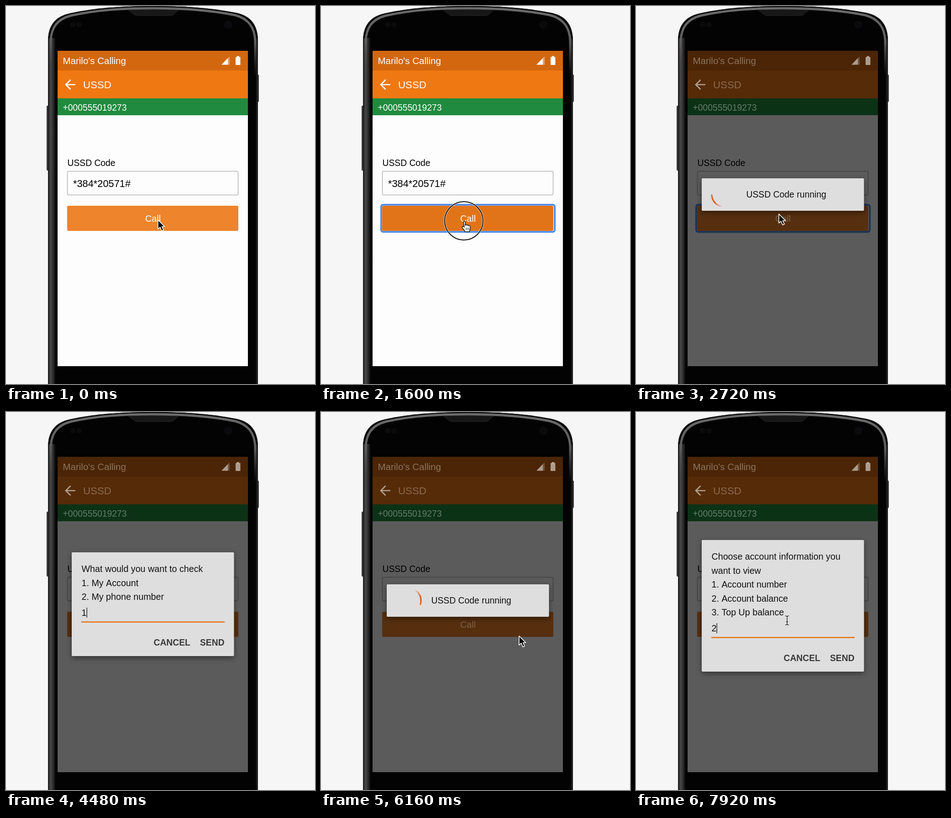
An HTML page with a canvas that plays this animation: 677x827 px, repeating every 8 s.

```html
<!DOCTYPE html>
<html lang="en">
<head>
<meta charset="utf-8">
<style>
  html, body { margin: 0; width: 100%; height: 100%; overflow: hidden; background: #f6f6f6; }
  canvas { display: block; }
</style>
</head>
<body>
<canvas id="stage" width="677" height="827"></canvas>
<script>
const c = document.getElementById('stage').getContext('2d');
const LOOP = 8000, DIM = 0.64;
const clamp = v => Math.max(0, Math.min(1, v));
const ease = v => v * v * (3 - 2 * v);
const ramp = (t, from, length) => clamp((t - from) / length);

function box(x, y, w, h, fill, r = 0) {
  c.fillStyle = fill;
  c.beginPath();
  c.roundRect(x, y, w, h, r);
  c.fill();
}

function frame(x, y, w, h, color, width, r) {
  c.strokeStyle = color;
  c.lineWidth = width;
  c.beginPath();
  c.roundRect(x, y, w, h, r);
  c.stroke();
}

function text(s, x, y, size, color = '#111', weight = '') {
  c.font = `${weight} ${size}px "Liberation Sans", Arial, sans-serif`;
  c.fillStyle = color;
  c.fillText(s, x, y);
}

function shape(d, fill, stroke, width) {
  const p = new Path2D(d);
  if (fill) { c.fillStyle = fill; c.fill(p); }
  if (stroke) { c.strokeStyle = stroke; c.lineWidth = width; c.stroke(p); }
}

function gradient(x0, y0, x1, y1, ...colors) {
  const g = c.createLinearGradient(x0, y0, x1, y1);
  colors.forEach((color, i) => g.addColorStop(i / (colors.length - 1), color));
  return g;
}

function drawPhone() {
  const body = 'M92 840V74C93 42 108 23 140 16C200 3 260 0 322 0C384 0 444 3 505 15C537 22 551 42 552 74V840Z';
  const rim = 'M98 160V77C99 47 112 29 142 21C202 8 260 5 322 5C384 5 442 8 502 20C532 28 545 47 546 77V160';
  box(89, 218, 5, 142, '#3a3a3a', 2);
  box(550, 150, 4, 60, '#3a3a3a', 2);
  c.save();
  c.clip(new Path2D(body));
  box(90, 0, 464, 827, '#030303');
  box(92, 70, 17, 757, gradient(92, 0, 109, 0, '#1c1c1c', '#484848', '#2c2c2c', '#030303'));
  box(547, 70, 5, 757, gradient(547, 0, 552, 0, '#030303', '#1c1c1c', '#3a3a3a'));
  shape(rim, null, gradient(0, 5, 0, 155, '#6c6c6c', '#5c5c5c', 'rgba(60,60,60,0)'), 5);
  shape(body, null, '#1a1a1a', 3);
  c.restore();
  shape('M268 9H378L368 18Q366 21 360 21H288Q282 21 280 18Z', '#171717', '#262626', 1);
  for (const [x, r] of [[487, 9], [146, 6], [160, 6]]) {
    c.beginPath();
    c.arc(x, 41, r, 0, 7);
    c.fillStyle = '#0b0b0e';
    c.fill();
  }
}

function drawScreen(t, dim) {
  const focused = t > 1440 && t < 3500;
  const hovered = t > 1100 && t < 1640;
  const fade = amount => { c.globalAlpha = 1 - amount * dim / DIM; };
  box(113, 98, 417, 690, '#fdfdfd');
  box(113, 98, 417, 43, '#d2670f');
  box(113, 141, 417, 61, '#ef7813');
  box(113, 202, 417, 37, '#208b3e');
  frame(134.5, 361.5, 374, 52, '#b5b5b5', 1.5, 3);
  text('*384*20571#', 147, 396, 21.8, '#000');
  if (focused) {
    frame(131.5, 434.5, 381, 60, '#9cc0f6', 4, 5);
    frame(132, 435, 380, 59, '#4484e4', 3, 4);
  }
  box(134, 437, 375, 55, hovered ? '#e17419' : '#ee842b', 3);

  box(113, 98, 417, 690, `rgba(0,0,0,${dim})`);

  text('USSD Code', 134.5, 350, 19.3, '#000');
  fade(0.64);
  text("Marilo's Calling", 124.5, 127, 20.5, '#fff');
  text('+000555019273', 124.5, 229, 19.3, '#fff');
  fade(0.7);
  text('USSD', 169, 180, 22.3, '#fff');
  fade(0.76);
  text('Call', 305, 472, 19.8, '#fff');
  fade(0.45);
  shape('M152 172H131.5M141.5 161.5L131 172L141.5 182.5', null, '#fff', 2.7);
  shape('M472 128.5L486 114V128.5Z', '#fff');
  shape('M486 114L490 110V128.5H486Z', 'rgba(255,255,255,.4)');
  box(503, 111.5, 10.5, 17.5, '#fff', 1);
  box(506, 109.5, 4.5, 3, '#fff');
  c.globalAlpha = 1;
}

function panel(y, h) {
  c.save();
  c.shadowColor = 'rgba(0,0,0,.45)';
  c.shadowBlur = 12;
  c.shadowOffsetY = 4;
  box(144, y, 355.5, h, '#dedede', 2);
  c.restore();
}

// Fades and scales a dialog in around the screen centre
function popup(k, draw) {
  if (k <= 0) return;
  c.save();
  c.globalAlpha = clamp(k * 1.2);
  const s = 0.9 + 0.1 * k;
  c.translate(321.5, 412.5);
  c.scale(s, s);
  c.translate(-321.5, -412.5);
  draw();
  c.restore();
}

function running(head) {
  panel(377, 71);
  text('USSD Code running', 241.5, 419, 19.35);
  const steps = 24, span = 80, rad = Math.PI / 180;
  for (let i = 0; i < steps; i++) {
    const a = head - span + span * i / steps;
    const k = i / steps;
    c.beginPath();
    c.arc(192.5, 412.5, 26.5, a * rad, (a + span / steps + 0.4) * rad);
    c.strokeStyle = `rgba(222,88,22,${clamp(0.2 + 1.6 * k)})`;
    c.lineWidth = 1 + 2.3 * Math.sin(Math.PI * (0.1 + k * 0.7));
    c.stroke();
  }
}

function menu(top, lines, digit, t, typedAt) {
  const last = top + 43 + 30.5 * (lines.length - 1);
  panel(top, last + 123 - top);
  lines.forEach((s, i) => text(s, 165.5, top + 43 + 30.5 * i, 19.7));
  const typed = t >= typedAt;
  if (typed) text(digit, 165.5, last + 35, 19.7);
  const blink = Math.abs(t - typedAt) % 1060 < 530;
  if (blink) box(typed ? 176.5 : 166, last + 17, 1.3, 22, '#111');
  box(165, last + 47, 314, 2.7, '#e87a1e');
  text('CANCEL', 323.5, last + 100, 19.3, '#3a3a3a', 'bold');
  text('SEND', 425, last + 100, 19.3, '#3a3a3a', 'bold');
}

const path = [
  [0, 333, 468], [600, 333, 468], [1150, 313, 470], [1640, 313, 470], [1760, 313, 468],
  [2300, 313, 468], [2700, 313, 455], [4700, 313, 455], [5350, 434, 490],
  [6800, 434, 490], [7350, 331, 456], [8000, 331, 456]
];

function pointerAt(t) {
  const i = path.findIndex((p, n) => n && t <= p[0]);
  const [t0, x0, y0] = path[i - 1], [t1, x1, y1] = path[i];
  const k = ease((t - t0) / (t1 - t0));
  return [x0 + (x1 - x0) * k, y0 + (y1 - y0) * k];
}

function clickRing(t, start) {
  if (t < start || t > start + 260) return;
  c.beginPath();
  c.arc(0, 0, 42, 0, 7);
  c.strokeStyle = 'rgba(255,255,255,.7)';
  c.lineWidth = 4;
  c.stroke();
  c.strokeStyle = '#111';
  c.lineWidth = 2;
  c.stroke();
}

function drawPointer(t) {
  if (t > 3700 && t < 4700) return;
  c.save();
  c.translate(...pointerAt(t));
  c.lineJoin = 'round';
  clickRing(t, 1440);
  clickRing(t, 5480);
  const hand = t > 1100 && t < 1680 || t > 5300 && t < 5740;
  if (hand) {
    shape('M-1 3Q-1 1 1 1Q3 1 3 4V10Q6 7 7 10Q10 8 11 11Q14 10 14 13V18Q13 21 12 24H3Q1 20-3 16Q-5 13-2 12L1 14Z', '#fff', '#111', 1.4);
    shape('M5 15V20M8 15V20M11 15V20', null, '#111', 1);
  } else if (t > 7200) {
    const beam = 'M-4-10Q0-10 0-7Q0-10 4-10M0-7V7M-4 10Q0 10 0 7Q0 10 4 10M-2 3H2';
    shape(beam, null, 'rgba(255,255,255,.7)', 3.5);
    shape(beam, null, '#222', 1.5);
  } else {
    shape('M0 0V20L4.7 15.8L8.2 24L12 22.3L8.6 14.5H14.5Z', '#000', '#fff', 1.6);
  }
  c.restore();
}

function draw(now) {
  const t = now % LOOP;
  const k = ramp(t, 1640, 150);
  const dim = DIM * (1 - (1 - k) ** 2);
  box(0, 0, 677, 827, '#f6f6f6');
  drawPhone();
  drawScreen(t, dim);
  if (t < 3500) {
    popup(k, () => running(55 + (t - 1760) * 0.505));
  } else if (t < 5760) {
    popup(ramp(t, 3500, 150), () => menu(307, [
      'What would you want to check', '1. My Account', '2. My phone number'
    ], '1', t, 4320));
  } else if (t < 6700) {
    popup(ramp(t, 5760, 150), () => running(20 + (t - 6160) * 0.505));
  } else {
    popup(ramp(t, 6700, 150), () => menu(280, [
      'Choose account information you', 'want to view',
      '1. Account number', '2. Account balance', '3. Top Up balance'
    ], '2', t, 7680));
  }
  drawPointer(t);
}

const start = performance.now();
function tick() {
  draw(performance.now() - start);
  requestAnimationFrame(tick);
}
tick();
</script>
</body>
</html>
```
